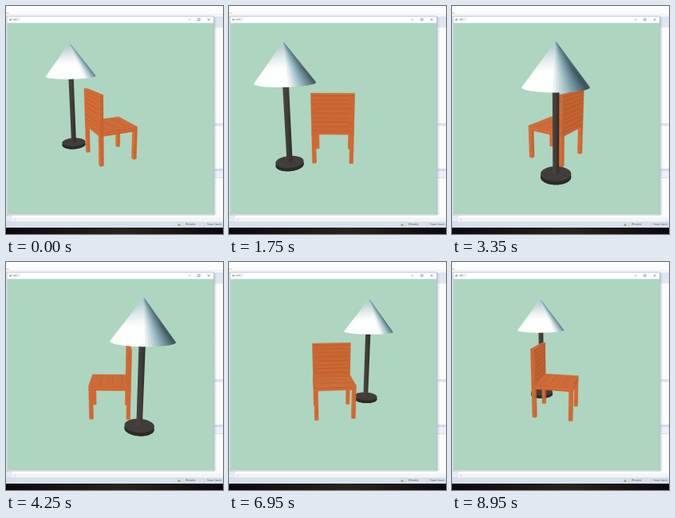
Write an HTML page that moves like this. It is 272 px wide and 286 px high and loops after 9 s.

```html
<!DOCTYPE html>
<html lang="en">
<head>
<meta charset="utf-8">
<title>Chair and lamp</title>
<style>
  html, body { margin: 0; width: 100%; height: 100%; overflow: hidden; background: #fff; }
  svg { display: block; width: 100vw; height: 100vh; }
  text { font-family: "Open Sans", "Noto Sans", sans-serif; font-size: 3.2px; fill: #555; }
</style>
</head>
<body>
<svg viewBox="0 0 272 286" preserveAspectRatio="none">
  <defs>
    <linearGradient id="tip" x1="0" y1="0" x2="0" y2="1">
      <stop offset="0" stop-color="#5f8792" stop-opacity=".5"/>
      <stop offset=".6" stop-color="#8fb2ba" stop-opacity="0"/>
    </linearGradient>
    <linearGradient id="pole">
      <stop offset="0" stop-color="#4c4742"/>
      <stop offset=".5" stop-color="#413c39"/>
      <stop offset="1" stop-color="#2f2b29"/>
    </linearGradient>
    <linearGradient id="bezel">
      <stop offset="0" stop-color="#0c0809"/>
      <stop offset=".55" stop-color="#2a2221"/>
      <stop offset="1" stop-color="#0c0809"/>
    </linearGradient>
    <linearGradient id="shadow">
      <stop offset="0" stop-color="#9fb4c4" stop-opacity=".6"/>
      <stop offset="1" stop-color="#9fb4c4" stop-opacity="0"/>
    </linearGradient>
  </defs>

  <!-- desktop behind the window -->
  <rect width="272" height="286" fill="#fcfcfd"/>
  <rect y="10.5" width="272" height="1" fill="#e6e9ef"/>
  <text x="0" y="10" opacity=".6">ns</text>
  <rect x="260" y="13" width="12" height="14" fill="#dfe6f0"/>
  <rect x="260" y="147" width="12" height="3.5" fill="#dbe3ef"/>
  <rect x="260" y="204" width="12" height="3" fill="#d3dbe9"/>
  <rect x="260" y="207" width="12" height="8" fill="#eef0f8"/>
  <rect x="260" y="215" width="12" height="1" fill="#d5dcea"/>
  <rect y="262" width="8" height="9" fill="#e6ebf3"/>
  <rect x="8" y="265.5" width="264" height="5" fill="#f3f4f6"/>
  <path d="M12.2 266.6l-1.6 1.4 1.6 1.4" fill="none" stroke="#aaa" stroke-width=".5"/>
  <rect y="271" width="272" height="7" fill="#d8e0ee"/>
  <rect y="270.6" width="272" height=".8" fill="#c6d0e0"/>
  <circle cx="217" cy="274.6" r="1.7" fill="#b5a878"/>
  <path d="M222 272v6M249 272v6" stroke="#b8c2d2" stroke-width=".5"/>
  <text x="225" y="275.3">Writable</text>
  <text x="252" y="275.3">Smart Insert</text>
  <rect y="278" width="272" height="8" fill="url(#bezel)"/>

  <!-- window -->
  <rect x="260.5" y="14" width="4" height="248" fill="url(#shadow)"/>
  <rect x="1" y="13" width="259.5" height="249" fill="#fff" stroke="#a9bcc8" stroke-width=".9"/>
  <circle cx="5.5" cy="17" r="1.6" fill="#a9b2bc"/>
  <text x="8.2" y="18.2" style="font-size:2.8px">Lab5_1</text>
  <path d="M228.6 17h2.8M240.5 15.7h2.6v2.6h-2.6zM252.7 15.6l2.8 2.8m0-2.8l-2.8 2.8" fill="none" stroke="#555" stroke-width=".5"/>
  <rect x="1.5" y="21.3" width="258.5" height="240" fill="#aed5c0"/>
  <g id="scene" stroke-linejoin="round"></g>
</svg>
<script>
const LOOP = 9000, STEP = 50, SPEED = 36;
const RAD = Math.PI / 180, TAU = Math.PI * 2;
const scene = document.getElementById('scene');

// Pitched perspective camera; X right, y up, Z away from the viewer.
const FOCAL = 312, CX = 130.7, CY = 141, DIST = 4.9, RISE = -0.72;
const SIN = Math.sin(16 * RAD), COS = Math.cos(16 * RAD);
const EYE = [0, -RISE * COS + DIST * SIN, -RISE * SIN - DIST * COS];
const LIGHT = [-2.2, 2, -0.9];

const clamp = (v, a = 0, b = 1) => Math.min(b, Math.max(a, v));
const lerp = (a, b, k) => a + (b - a) * k;
const mix = (a, b, k) => a.map((v, i) => lerp(v, b[i], k));
const sub = (a, b) => a.map((v, i) => v - b[i]);
const dot = (a, b) => a.reduce((s, v, i) => s + v * b[i], 0);
const unit = a => a.map(v => v / Math.hypot(...a));
const rgb = c => `rgb(${c.map(Math.round)})`;
const noise = n => { const s = Math.sin(n * 127.1 + 3.7) * 43758.5453; return s - Math.floor(s); };

function project([x, y, z]) {
  const depth = DIST - y * SIN + z * COS;
  const up = RISE + y * COS + z * SIN;
  return [CX + FOCAL * x / depth, CY - FOCAL * up / depth];
}
const trace = pts => 'M' + pts.map(p => project(p).map(v => v.toFixed(2)).join(' ')).join('L');
const poly = (pts, fill) => `<path d="${trace(pts)}Z" fill="${fill}"/>`;

// Wood grain runs parallel to the edge a-b.
function woodFace([a, b, c, d], tone, streaks, seed) {
  const fill = rgb(tone);
  let out = `<path d="${trace([a, b, c, d])}Z" fill="${fill}" stroke="${fill}" stroke-width=".3"/>`;
  for (let i = 0; i < streaks; i++) {
    const k = (i + 0.15 + 0.7 * noise(seed + i)) / streaks;
    const from = noise(seed + i + 40) * 0.2, to = 1 - noise(seed + i + 80) * 0.2;
    const l = mix(a, d, k), r = mix(b, c, k);
    const color = i % 2 ? '#e58848' : '#94501f';
    out += `<path d="${trace([mix(l, r, from), mix(l, r, to)])}" stroke="${color}" ` +
      `stroke-width="${(0.5 + noise(seed + i + 9) * 0.6).toFixed(2)}" opacity=".3"/>`;
  }
  return out;
}

function chair(angle) {
  const c = Math.cos(angle), s = Math.sin(angle);
  const eyeU = -EYE[2] * c, eyeW = EYE[2] * s;
  const at = (u, y, w) => [u * s + w * c, y, -u * c + w * s];
  const flatLight = unit([LIGHT[0], 0, LIGHT[2]]);

  function box(u0, u1, y0, y1, w0, w1, tone, grain, seed) {
    const lit = (u, w) => mix(tone, [0, 0, 0], 0.06 - 0.06 * dot(at(u, 0, w), flatLight));
    const sideU = (u, dir) =>
      woodFace([at(u, y1, w0), at(u, y1, w1), at(u, y0, w1), at(u, y0, w0)], lit(dir, 0), 3, seed + 5);
    const sideW = (w, dir) =>
      woodFace([at(u0, y1, w), at(u1, y1, w), at(u1, y0, w), at(u0, y0, w)], lit(0, dir), grain, seed);
    let out = '';
    if (eyeU > u1) out += sideU(u1, 1);
    if (eyeU < u0) out += sideU(u0, -1);
    if (eyeW > w1) out += sideW(w1, 1);
    if (eyeW < w0) out += sideW(w0, -1);
    const top = mix(tone, [200, 106, 58], 0.8);
    return out + woodFace([at(u0, y1, w0), at(u1, y1, w0), at(u1, y1, w1), at(u0, y1, w1)],
      top, w1 - w0 > 0.2 ? 6 : 0, seed + 20);
  }

  const H = 0.372, T = 0.066, TOP = 0.64, UNDER = 0.56;
  const orange = [218, 109, 52], panel = [211, 106, 52];
  const legs = [[-1, -1], [1, -1], [-1, 1], [1, 1]]
    .map(([i, j]) => ({ u: i < 0 ? -H : H - T, w: j < 0 ? -H : H - T }))
    .sort((p, q) => at(q.u, 0, q.w)[2] - at(p.u, 0, p.w)[2])
    .map(p => box(p.u, p.u + T, 0, UNDER, p.w, p.w + T, orange, 4, 60));
  const seat = box(-H, H, UNDER, TOP, T - H, H, orange, 2, 11);
  const back = box(-H, H, UNDER, 1.285, -H, T - H, panel, 18, 31);
  return legs.join('') + (eyeW > T - H ? back + seat : seat + back);
}

function shadeColor(k) {
  const dark = [60, 86, 94], mid = [140, 174, 184], white = [253, 254, 254];
  return rgb(k < 0.5 ? mix(dark, mid, k * 2) : mix(mid, white, k * 2 - 1));
}

function lamp(x, z) {
  const ring = (r, y, a) => [x + r * Math.cos(a), y, z + r * Math.sin(a)];
  const circle = (r, y, n = 40) => Array.from({ length: n }, (_, i) => ring(r, y, i / n * TAU));
  const FLOOR = 0.03, FOOT = 0.09, RIM = 1.49, TIP = 2.12;
  const BASE = 0.245, R = 0.49, POLE = 0.05;

  const toEye = Math.atan2(EYE[2] - z, EYE[0] - x);
  const half = Array.from({ length: 21 }, (_, i) => toEye + (i / 20 - 0.5) * Math.PI);
  const wall = [...half.map(a => ring(BASE, FLOOR, a)), ...half.reverse().map(a => ring(BASE, FOOT, a))];
  let out = poly(circle(BASE, FLOOR), '#2e2a28') + poly(wall, '#2e2a28') + poly(circle(BASE, FOOT), '#423d3a');

  const l = toEye - Math.PI / 2, r = toEye + Math.PI / 2;
  out += poly([ring(POLE, FOOT, l), ring(POLE, RIM, l), ring(POLE, RIM, r),
    ring(POLE, FOOT, r), ring(POLE, FOOT, toEye)], 'url(#pole)');

  // Each sector reaches under the next one, so no seams show.
  const tip = [x, TIP, z], N = 72, h = TIP - RIM;
  const toLight = unit(sub(LIGHT, [x, 1.6, z]));
  let hull = '';
  for (let i = 0; i < N; i++) {
    const a = toEye + Math.PI + (i + 0.5) / N * TAU;
    const n = unit([h * Math.cos(a), R, h * Math.sin(a)]);
    if (dot(n, sub(EYE, ring(R, RIM, a))) <= 0) continue;
    const k = clamp((dot(n, toLight) + 0.55) / 0.75);
    const edge = j => ring(R, RIM, a + j / N * TAU);
    out += poly([tip, edge(-0.5), edge(0.5), edge(1)], shadeColor(k));
    hull += trace([tip, edge(-0.5), edge(0.5)]) + 'Z';
  }
  return out + `<path d="${hull}" fill="url(#tip)"/>`;
}

function draw(ms) {
  const turn = SPEED * ms / 1000;
  const a = (149 + turn) * RAD;
  const x = 0.91 * Math.cos(a), z = 0.91 * Math.sin(a);
  const parts = [chair((25.5 + turn) * RAD), lamp(x, z)];
  if (z > 0) parts.reverse();
  scene.innerHTML = parts.join('');
}

const start = performance.now();
let shown = -1;
function tick() {
  const t = (performance.now() - start) % LOOP;
  const ms = Math.floor(t / STEP) * STEP;
  if (ms !== shown) draw(shown = ms);
  requestAnimationFrame(tick);
}
tick();
</script>
</body>
</html>
```
